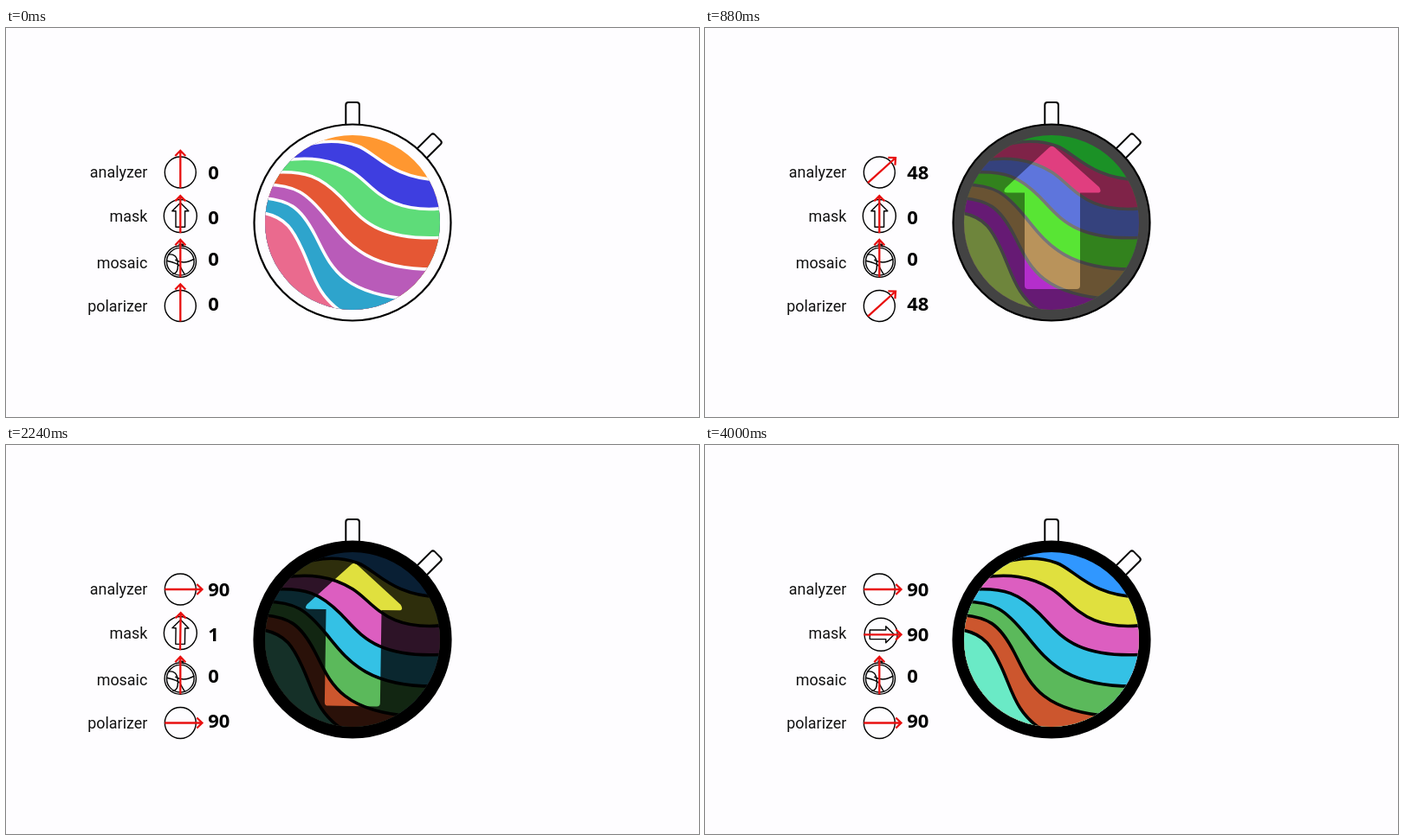
These frames come from a looping animation (800x450 px, 4.52 s). An HTML page:

```html
<!DOCTYPE html>
<html lang="en">
<head>
<meta charset="utf-8">
<title>Polarizer clock</title>
<style>
html, body { margin: 0; width: 100%; height: 100%; overflow: hidden; background: #fefdff; }
svg { display: block; width: 100vw; height: 100vh; }
.label { font: 400 17.9px Roboto, "Liberation Sans", sans-serif; text-anchor: end; fill: #111; }
.value { font: 700 22px "Open Sans", "Noto Sans", sans-serif; fill: #000; }
.thin { fill: none; stroke: #000; stroke-width: 1.4; stroke-linejoin: round; }
.red { fill: none; stroke: #e81010; stroke-width: 2.3; }
.case { fill: #fefdff; stroke: #000; stroke-width: 2; }
</style>
</head>
<body>
<svg viewBox="0 0 800 450">
  <defs>
    <clipPath id="face"><circle cx="400" cy="225" r="101"/></clipPath>
    <mask id="cut" maskUnits="userSpaceOnUse" x="280" y="100" width="240" height="250">
      <circle cx="400" cy="225" r="114" fill="#fff"/>
      <path id="hole" d="M397 138.500Q400.500 135 404 138.500L455 184Q459 190.500 453 190.500H433V298Q433 302 429 302H373Q369 302 369 298V190.500H349Q343 190.500 347 185Z"/>
    </mask>
    <path id="needle" class="red" d="M0 18V-25M-6-19L0-25.200L6-19"/>
  </defs>
  <rect class="case" x="392.300" y="86" width="15.600" height="32" rx="3"/>
  <rect class="case" x="392.300" y="86" width="15.600" height="32" rx="3" transform="rotate(45 400 225)"/>
  <circle id="rim" cx="400" cy="225" r="113.500"/>
  <g id="bands" clip-path="url(#face)" stroke-width="3.600"></g>
  <rect id="shade" x="280" y="100" width="240" height="250" mask="url(#cut)"/>
  <circle cx="400" cy="225" r="113.500" fill="none" stroke="#000" stroke-width="2.200"/>
  <g id="dials"></g>
</svg>
<script>
const $ = id => document.getElementById(id);
const LOOP = 4520, STEP = 40;

function add(parent, tag, attrs, text) {
  const el = document.createElementNS('http://www.w3.org/2000/svg', tag);
  for (const k in attrs) el.setAttribute(k, attrs[k]);
  if (text !== undefined) el.textContent = text;
  return parent.appendChild(el);
}

// Each band: hue, saturation, lightness and its upper edge
const bands = [
  [30, 100, 59.4, 280, 110, 'H520'],
  [240, 72, 56, 335, 139, 'C360 130 385 129 406 136.5S445 175.5 505 176'],
  [133, 64, 61.4, 320, 153, 'C350 149 375 151 400 166.5S438 217 510 208'],
  [12, 77, 55, 310, 167, 'C346 165 363 172 386 195S425 248 510 242'],
  [300, 40, 54, 295, 181, 'C335 181 347 191 370 219S415 281 500 279'],
  [195, 63, 49, 290, 196, 'C327 198 340 207 357 240S384 308 470 314'],
  [343, 75, 66.7, 290, 213, 'C324 216 333 236 344 261S360 311 390 330']
].map(([h, s, l, x, y, edge]) => ({
  h, s, l, el: add($('bands'), 'path', { d: `M${x} ${y}${edge}V350H280V${y}Z` })
}));

const arrowIcon = 'M0-17L9.500-7.500H5.300V11H-5.300V-7.500H-9.500Z';
const mosaicIcon = 'M-14-8Q-4-10-3 2T-9 14M-16-1Q-2 2 0 6T5 15M-6-2Q4 4 16-3M-2-20H3V-17';

// Pivot, baselines, ring offset and radius, icon
function dial(name, y, labelY, valueY, dy, r, icon) {
  const root = $('dials');
  add(root, 'text', { class: 'label', x: 163.3, y: labelY }, name);
  const num = add(root, 'text', { class: 'value', x: 233.3, y: valueY }, '0');
  const g = add(root, 'g', {});
  add(g, 'circle', { class: 'thin', cy: dy, r });
  if (icon === mosaicIcon) add(g, 'circle', { class: 'thin', r: 15.8, 'stroke-width': 1 });
  if (icon) add(g, 'path', { class: 'thin', d: icon });
  add(g, 'use', { href: '#needle' });
  return deg => {
    num.textContent = Math.round(deg);
    g.setAttribute('transform', `translate(201.300 ${y}) rotate(${deg})`);
  };
}

const setAnalyzer = dial('analyzer', 167, 173, 175, 0, 18);
const setMask = dial('mask', 219.3, 224, 227.3, -1.8, 19, arrowIcon);
const setMosaic = dial('mosaic', 270.2, 278, 275, 0, 18.2, mosaicIcon);
const setPolarizer = dial('polarizer', 321.5, 327.5, 327, 0, 18);
setMosaic(0);

const ratio = (t, start, span) => Math.min(1, Math.max(0, (t - start) / span));
const smooth = p => p * p * (3 - 2 * p);
const steep = p => p < .5 ? (2 * p) ** 2.5 / 2 : 1 - (2 - 2 * p) ** 2.5 / 2;

function draw(ms) {
  const t = Math.floor(ms % LOOP / STEP + .001) * STEP;
  const turn = smooth(ratio(t, 400, 920));
  const swing = steep(ratio(t, 2140, 962));
  const pol = 90 * turn, mask = 90 * swing;

  setAnalyzer(pol);
  setPolarizer(pol);
  setMask(mask);

  const v = 1 - turn;
  const base = `rgb(${254 * v},${253 * v},${255 * v})`;
  $('rim').setAttribute('fill', base);
  $('bands').setAttribute('stroke', base);
  for (const b of bands) b.el.setAttribute('fill', `hsl(${(b.h + 2 * pol) % 360},${b.s}%,${b.l}%)`);
  $('shade').setAttribute('opacity', .8 * turn * (1 - swing));
  $('hole').setAttribute('transform', `rotate(${mask} 400 225)`);
}

const start = performance.now();
function tick() {
  draw(performance.now() - start);
  requestAnimationFrame(tick);
}
draw(0);
requestAnimationFrame(tick);
</script>
</body>
</html>
```
